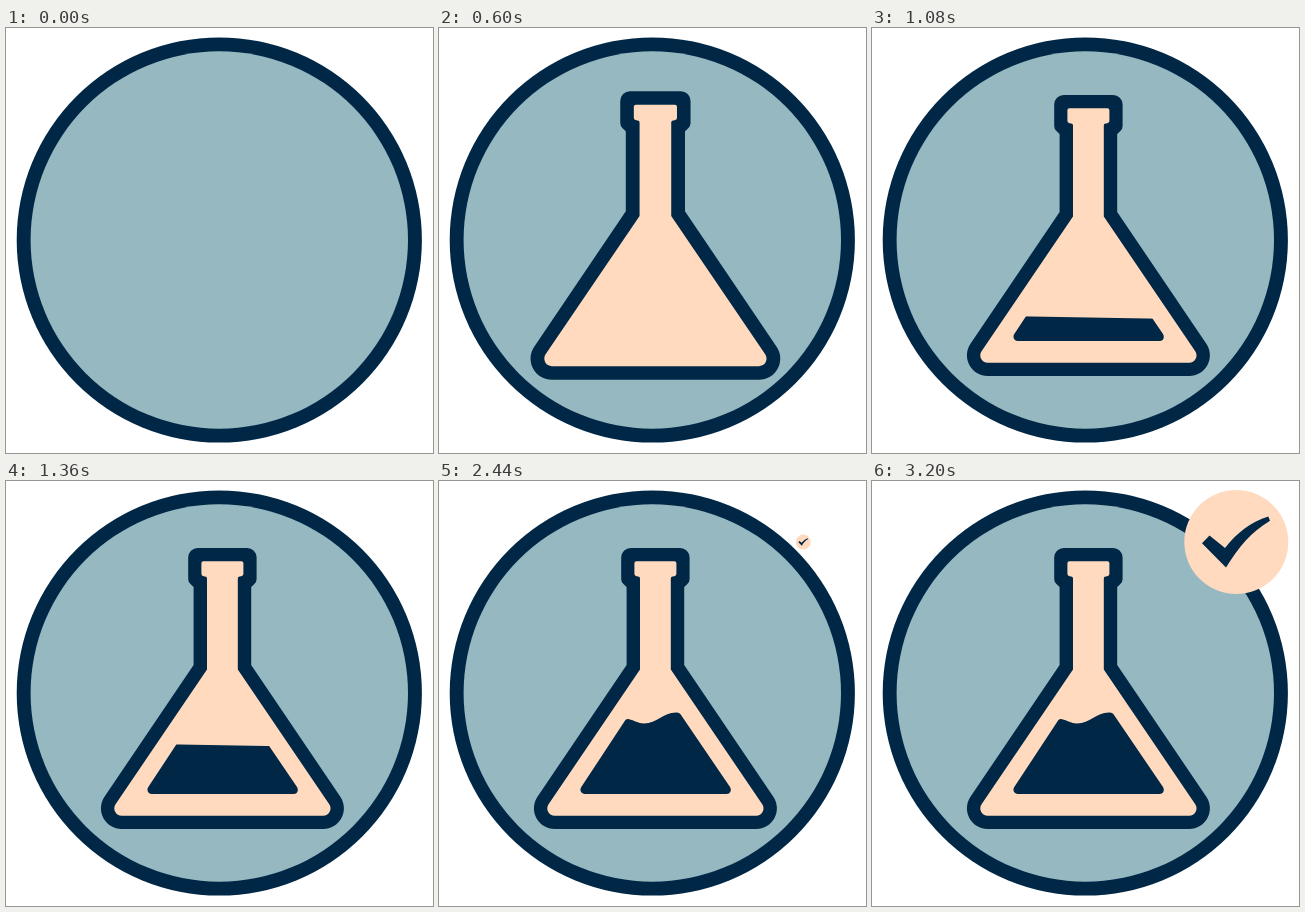
Write an HTML page with a canvas that moves like this. It is 427 px wide and 425 px high and loops after 3.84 s.

```html
<!DOCTYPE html>
<html lang="en">
<head>
<meta charset="utf-8">
<title>Flask with check mark</title>
<style>
  html, body { margin: 0; width: 100%; height: 100%; overflow: hidden; background: #fff; }
  canvas { display: block; width: 427px; height: 425px; }
</style>
</head>
<body>
<canvas id="stage"></canvas>
<script>
const W = 427, H = 425, LOOP = 3840, STEP = 40;
const NAVY = '#002846', BLUE = '#96b8c1', PEACH = '#ffdabf';

const canvas = document.getElementById('stage');
const ctx = canvas.getContext('2d');
const ratio = window.devicePixelRatio || 1;
canvas.width = Math.round(W * ratio);
canvas.height = Math.round(H * ratio);

// cubic-bezier(0, 0, .58, 1), solved by bisection
function easeOut(x) {
  let lo = 0, hi = 1;
  for (let i = 0; i < 24; i++) {
    const s = (lo + hi) / 2;
    if (1.74 * s * s - 0.74 * s * s * s < x) lo = s; else hi = s;
  }
  return lo * lo * (3 - 2 * lo);
}

// Grow past full size, then settle within 800 ms
function popScale(t) {
  const p = t / 800, peak = 1.06;
  if (p <= 0) return 0;
  if (p >= 1) return 1;
  return p < 0.6 ? peak * easeOut(p / 0.6)
                 : peak + (1 - peak) * easeOut((p - 0.6) / 0.4);
}

// Closed polygon from [x, y, corner radius] points
function roundedPath(pts) {
  const path = new Path2D();
  const last = pts[pts.length - 1];
  path.moveTo((last[0] + pts[0][0]) / 2, (last[1] + pts[0][1]) / 2);
  pts.forEach(([x, y, r], i) => {
    const next = pts[(i + 1) % pts.length];
    path.arcTo(x, y, next[0], next[1], r);
  });
  path.closePath();
  return path;
}

// Right half as [offset, y, radius], mirrored around the flask axis
function mirrored(half) {
  const axis = 216.4;
  const right = half.map(([d, y, r]) => [axis + d, y, r]);
  const left = half.map(([d, y, r]) => [axis - d, y, r]).reverse();
  return roundedPath(right.concat(left));
}

function disc(x, y, r, color) {
  ctx.beginPath();
  ctx.arc(x, y, r, 0, Math.PI * 2);
  ctx.fillStyle = color;
  ctx.fill();
}

function fill(path, color) {
  ctx.fillStyle = color;
  ctx.fill(path);
}

function scaledAround(x, y, s, draw) {
  if (s <= 0) return;
  ctx.save();
  ctx.translate(x, y);
  ctx.scale(s, s);
  ctx.translate(-x, -y);
  draw();
  ctx.restore();
}

const glass = mirrored([
  [34.2, 67, 9.5], [34.2, 101, 7], [28.8, 106, 1], [28.8, 184, 0], [139.8, 348, 20.7]
]);
const inside = mirrored([
  [21, 80.3, 2], [21, 95.2, 2.5], [15.4, 95.6, 2], [15.4, 188.5, 0], [114.7, 334.7, 7.4]
]);

const liquid = new Path2D(
  'M184.6 241.8 C186.2 239 187.2 237.6 190 238.2 C195 239 199 242.4 205 242.4' +
  ' C218 242.4 224 231.6 237 231.5 C240 231.4 241 232.4 242.2 234.2' +
  ' L291 306 C293 309.6 291.2 313 287.5 313 L146 313 C142 313 140.3 309 142.3 306 Z');

const tick = new Path2D(
  'M330 62.3 L337.5 54.6 L353 67 C365 51.5 379 41 396.3 35.5 L398 39.8' +
  ' C379 51 367 66 354 86.5 Z');

function drawLiquid(t) {
  if (t <= 800) return;
  ctx.save();
  if (t < 1720) {
    // The surface rises at a steady rate with a slight tilt
    const y = 289.6 - (t - 1080) * 0.0902, tilt = 1.5;
    ctx.beginPath();
    ctx.moveTo(130, y - tilt);
    ctx.lineTo(304, y + tilt);
    ctx.lineTo(304, 320);
    ctx.lineTo(130, 320);
    ctx.clip();
  }
  fill(liquid, NAVY);
  ctx.restore();
}

function render(t) {
  ctx.setTransform(ratio, 0, 0, ratio, 0, 0);
  ctx.fillStyle = '#fff';
  ctx.fillRect(0, 0, W, H);
  disc(213.3, 212, 202.6, NAVY);
  disc(213.3, 212, 188.7, BLUE);

  scaledAround(216.4, 207.5, popScale(t), () => {
    fill(glass, NAVY);
    fill(inside, PEACH);
  });
  drawLiquid(t);
  scaledAround(364.3, 61, popScale(t - 2400), () => {
    disc(364.3, 61, 52, PEACH);
    fill(tick, NAVY);
  });
}

const start = performance.now();
function tickFrame() {
  const t = Math.max(0, performance.now() - start) % LOOP;
  render(Math.floor(t / STEP) * STEP);
  requestAnimationFrame(tickFrame);
}
tickFrame();
</script>
</body>
</html>
```
